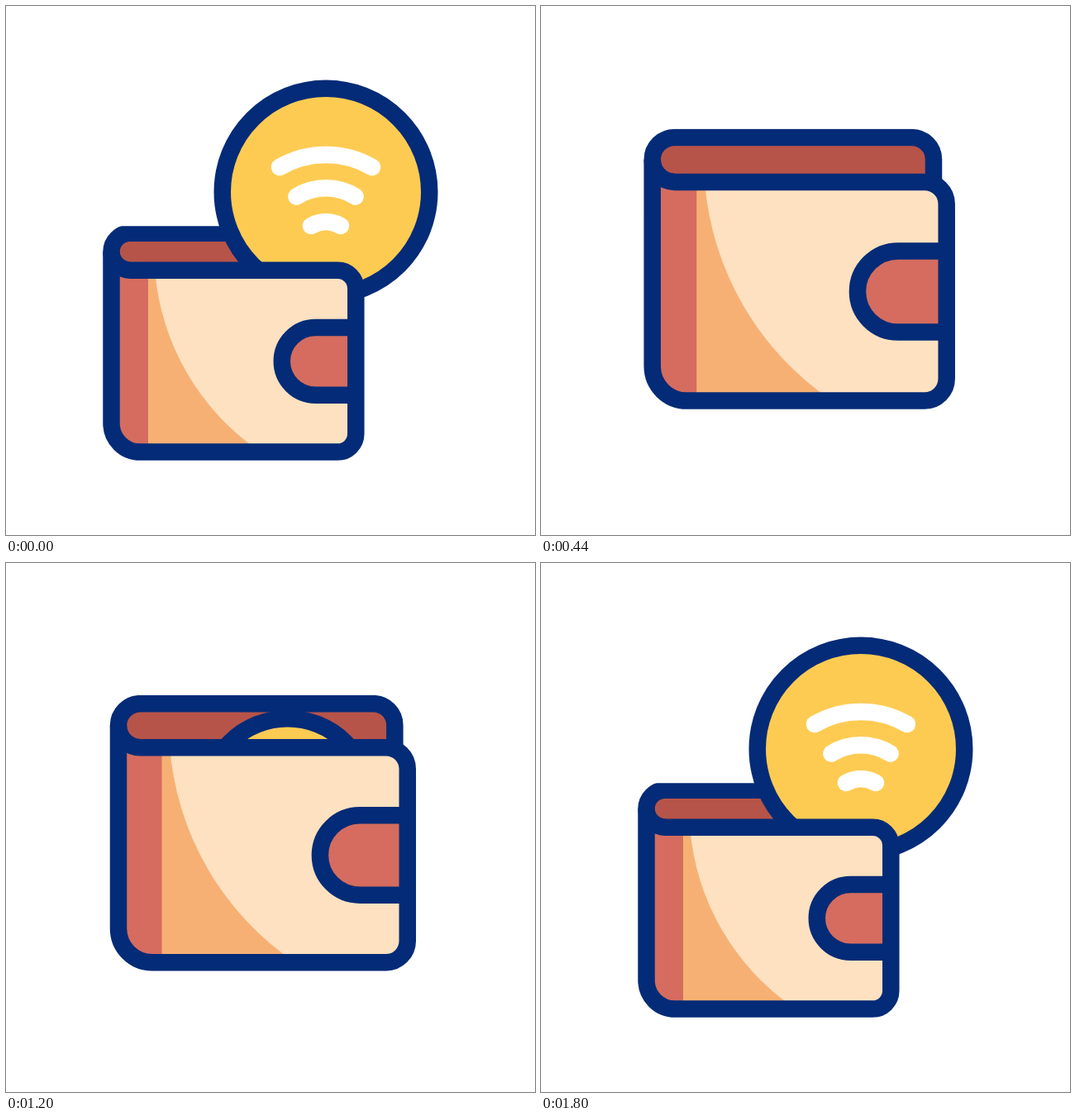
These frames come from a looping animation (640 by 640 pixels, 2 s). An HTML page without scripts:

```html
<!DOCTYPE html>
<html lang="en">
<head>
<meta charset="utf-8">
<title>Wallet and coin</title>
<style>
@property --x { syntax: "<length>"; inherits: true; initial-value: 275.4px; }
@property --y { syntax: "<length>"; inherits: true; initial-value: 407.2px; }
@property --s { syntax: "<number>"; inherits: true; initial-value: 1; }
@property --d { syntax: "<number>"; inherits: true; initial-value: 100; }

html, body { margin: 0; width: 100%; height: 100%; overflow: hidden; background: #fff; }
svg { display: block; width: 100%; height: 100%; }

/* Outlines keep their weight while the shapes scale */
.wallet, .coin {
  transform: translate(var(--x), var(--y)) scale(var(--s));
  stroke-width: calc(20.5px / var(--s));
  animation: 2s linear infinite;
}
.wallet { animation-name: wallet; }
.coin { animation-name: coin; }
.line { stroke: #042b77; }
.wave {
  fill: none;
  stroke: #fff;
  stroke-linecap: round;
  stroke-dasharray: calc(var(--d) * 1px) 200px;
  stroke-dashoffset: calc((var(--d) - 100) * .5px);
  animation: 2s linear infinite;
}
.high { animation-name: high; }
.mid { animation-name: mid; }
.low { animation-name: low; }

@keyframes wallet {
  0% { --x: 275.4px; --y: 407.2px; --s: .816; animation-timing-function: cubic-bezier(.5, 0, .7, .46); }
  15% { --x: 284px; --y: 365.8px; --s: .834; animation-timing-function: cubic-bezier(.35, .4, .6, 1); }
  27% { --x: 321px; --y: 304.5px; --s: 1.025; animation-timing-function: ease-in-out; }
  31%, 50.98% { --x: 320.5px; --y: 306.3px; --s: .979; }
  50.99% { --x: 320.75px; --y: 305.75px; --s: 1; }
  51% { --x: 320.75px; --y: 305.75px; --s: 1; animation-timing-function: cubic-bezier(.5, 0, .75, .45); }
  60% { --x: 311px; --y: 326.45px; --s: .9655; animation-timing-function: cubic-bezier(.3, .15, .6, 1); }
  70% { --x: 264px; --y: 423.5px; --s: .74; animation-timing-function: ease-in-out; }
  73% { --x: 266.5px; --y: 421.3px; --s: .717; animation-timing-function: cubic-bezier(.4, 0, .7, .7); }
  77% { --x: 272px; --y: 410.5px; --s: .795; animation-timing-function: ease-out; }
  90%, 100% { --x: 275.4px; --y: 407.2px; --s: .816; }
}
@keyframes coin {
  0% { --x: 387px; --y: 225px; --s: 1; animation-timing-function: cubic-bezier(.36, 0, .66, -.66); }
  16.4%, 51% { --x: 321.4px; --y: 310.6px; --s: .719; animation-timing-function: cubic-bezier(.5, 0, .75, .5); }
  60% { --x: 340.5px; --y: 287.5px; --s: .79; animation-timing-function: cubic-bezier(.35, .42, .65, .8); }
  73% { --x: 382px; --y: 232.5px; --s: .976; animation-timing-function: ease-out; }
  76.5% { --x: 388px; --y: 228.5px; --s: 1.017; animation-timing-function: ease-in-out; }
  90%, 100% { --x: 387px; --y: 225px; --s: 1; }
}
@keyframes high {
  0%, 3%, 72.5%, 100% { --d: 100; visibility: visible; }
  11%, 63% { --d: 0; visibility: hidden; }
}
@keyframes mid {
  0%, 9%, 79%, 100% { --d: 100; visibility: visible; }
  17%, 71.3% { --d: 0; visibility: hidden; }
}
@keyframes low {
  0%, 14%, 83%, 100% { --d: 100; visibility: visible; }
  20%, 76.5% { --d: 0; visibility: hidden; }
}
</style>
</head>
<body>
<svg viewBox="0 0 640 640">
  <clipPath id="trim"><path d="M0 133H640V640H0z"/></clipPath>

  <g class="wallet">
    <g transform="translate(-320.75 -305.75)" clip-path="url(#trim)">
      <path class="line" fill="#b75449" d="M486 198.5V170.5a27 27 0 0 0-27-27H167a27.5 27.5 0 0 0 0 55"/>
    </g>
  </g>

  <g class="coin">
    <circle class="line" r="125.25" fill="#fecb52"/>
    <path class="wave high" pathLength="100" d="M-56-30A112 112 0 0 1 56-30"/>
    <path class="wave mid" pathLength="100" d="M-35.7 5.5A68 68 0 0 1 35.7 5.5"/>
    <path class="wave low" pathLength="100" d="M-18 41A37 37 0 0 1 18 41"/>
  </g>

  <g class="wallet">
    <g transform="translate(-320.75 -305.75)" clip-path="url(#trim)">
      <path id="body" fill="#d56c5f" d="M139.5 171V425.5a42.5 42.5 0 0 0 42.5 42.5H475a27 27 0 0 0 27-27V225.5a27 27 0 0 0-27-27H167a27.5 27.5 0 0 1-27.5-27.5"/>
      <path fill="#f7b074" d="M194 198.5H300L370 468H194z"/>
      <path fill="#fde1c0" d="M204 198.5A360 360 0 0 0 361 468H475a27 27 0 0 0 27-27V225.5a27 27 0 0 0-27-27z"/>
      <path class="line" fill="#d56c5f" d="M502 283.5H442.25a50 50 0 0 0 0 100H502"/>
      <path class="line" fill="none" d="M139.5 171V425.5a42.5 42.5 0 0 0 42.5 42.5H475a27 27 0 0 0 27-27V225.5a27 27 0 0 0-27-27H167a27.5 27.5 0 0 1-27.5-27.5"/>
    </g>
  </g>
</svg>
</body>
</html>
```
